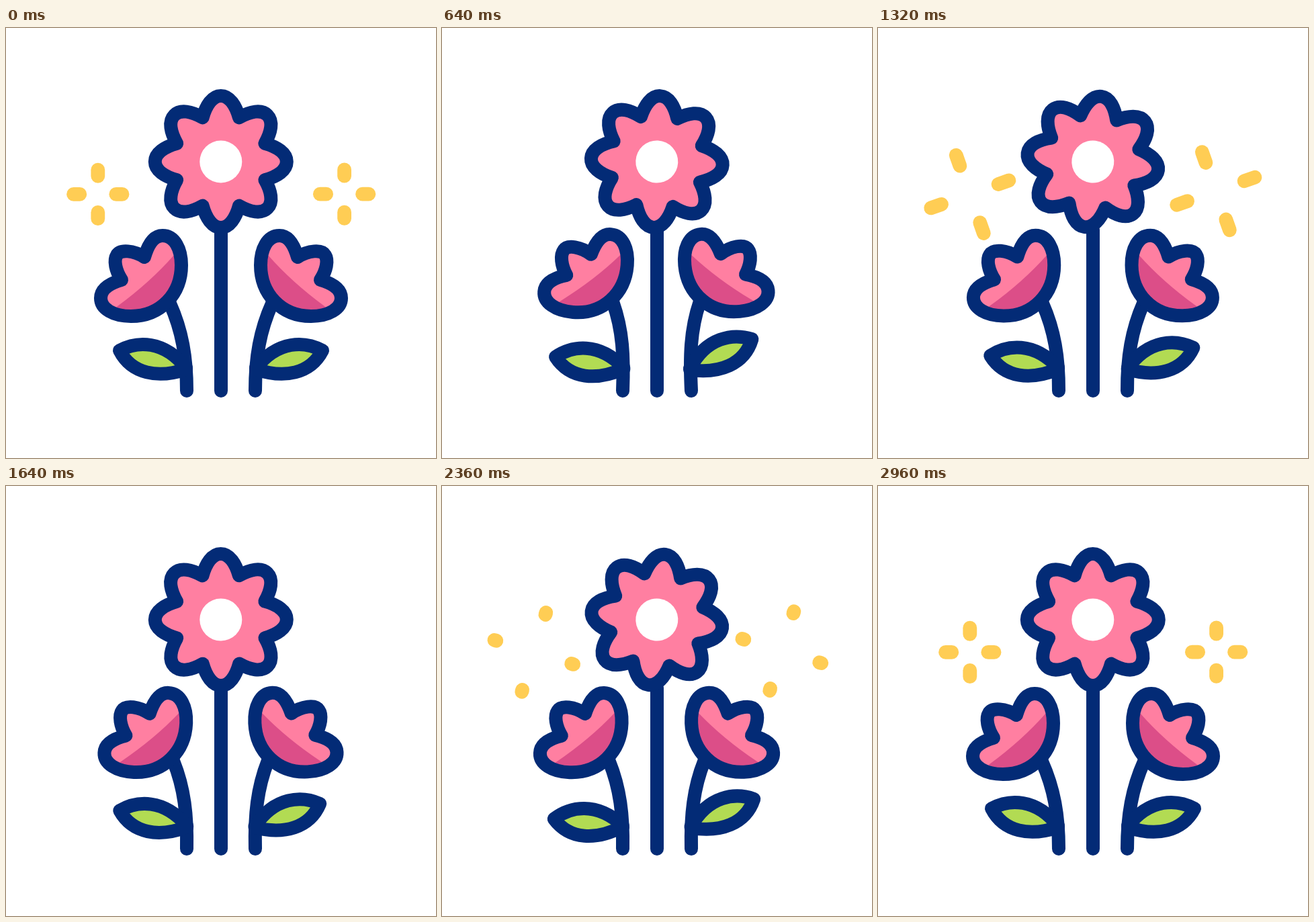
Recreate the animation shown at these times as an HTML page with a canvas. Size 640x640 px, loop 3000 ms.

```html
<!DOCTYPE html>
<html lang="en">
<head>
<meta charset="utf-8">
<title>Swaying flowers</title>
<style>
  html, body { margin: 0; width: 100%; height: 100%; overflow: hidden; background: #fff; }
  canvas { display: block; width: 100vmin; height: 100vmin; }
</style>
</head>
<body>
<canvas id="stage" width="640" height="640"></canvas>
<script>
const ctx = document.getElementById('stage').getContext('2d');
const NAVY = '#032b76', PINK = '#ff7fa1', ROSE = '#dc4e88', GREEN = '#b2db53', GOLD = '#ffcd54';
const LOOP = 3000, STEP = 40, SPAN = LOOP - STEP;
const RAD = Math.PI / 180;

const TULIP = new Path2D(`M141 402 C141 388 155 380 172 375 C163 361 160 346 165 338
  C170 329 190 331 206 341 C211 324 219 309 233 309 C251 309 261 329 261 353
  C261 395 231 429 186 429 C160 429 141 418 141 402Z`);
const SHADE = new Path2D('M152 424 L166 414 Q215 378 250 338 L262 322 L290 440 L150 450Z');
const LEAF = new Path2D('M169 480 C195 466 235 464 268 506 L268 508 C226 522 187 515 169 480Z');
const BLOOM = makeBloom(8, 71, 98);

const ramp = (t, a, b) => Math.min(1, Math.max(0, (t - a) / (b - a)));
const smooth = u => u * u * (3 - 2 * u);

// rises from 0 at a to 1 at peak, back to 0 at b
const swell = (t, a, peak, b) => smooth(ramp(t, a, peak)) * (1 - smooth(ramp(t, peak, b)));

const sway = t => swell(t, 0, 820, 1420) + swell(t, 1400, 1930, 2680);
const leftLeaf = t => -11 * swell(t, 240, 1000, 1580) - 10.6 * swell(t, 1420, 2200, SPAN);
const rightLeaf = t => 9.5 * swell(t, 240, 1000, 1460) + 8.5 * swell(t, 1440, 2130, 2850);
const bloomTurn = t => 7.4 * (swell(t, 0, 400, 820) + swell(t, 860, 1340, 1640)
  - 0.95 * swell(t, 1620, 1880, 2120) + swell(t, 2120, 2370, SPAN));

function rotate(x, y, deg) {
  const c = Math.cos(deg * RAD), s = Math.sin(deg * RAD);
  return [x * c - y * s, x * s + y * c];
}

function makeBloom(count, inner, outer) {
  const path = new Path2D();
  const [x, y] = rotate(0, -inner, 180 / count);
  const half = [[x, y], [x - 5, y - 18], [13, -outer]];
  const petal = [...half.map(([px, py]) => [-px, py]), [0, -outer], ...half.reverse()];
  for (let i = 0; i < count; i++) {
    const p = petal.map(([px, py]) => rotate(px, py, i * 360 / count));
    if (!i) path.moveTo(...p[0]);
    path.bezierCurveTo(...p[1], ...p[2], ...p[3]);
    path.bezierCurveTo(...p[4], ...p[5], ...p[6]);
  }
  path.closePath();
  return path;
}

function turn(x, y, deg) {
  ctx.translate(x, y);
  ctx.rotate(deg * RAD);
  ctx.translate(-x, -y);
}

// the root stays put and upright while the tip follows the flower
function stalk(lean) {
  ctx.save();
  ctx.translate(269, 540);
  ctx.beginPath();
  ctx.moveTo(0, 0);
  ctx.bezierCurveTo(...rotate(0, -50, lean / 2), ...rotate(-7, -90, lean), ...rotate(-25, -130, lean));
  ctx.stroke();
  ctx.restore();
}

function tulip(lean, leafAngle) {
  ctx.save();
  stalk(lean);
  turn(266, 538, lean);

  ctx.save();
  turn(262, 508, leafAngle);
  ctx.fillStyle = GREEN;
  ctx.fill(LEAF);
  ctx.stroke(LEAF);
  ctx.restore();

  ctx.fillStyle = PINK;
  ctx.fill(TULIP);
  ctx.save();
  ctx.clip(TULIP);
  ctx.fillStyle = ROSE;
  ctx.fill(SHADE);
  ctx.restore();
  ctx.stroke(TULIP);
  ctx.restore();
}

function daisy(angle) {
  ctx.beginPath();
  ctx.moveTo(320, 300);
  ctx.lineTo(320, 540);
  ctx.stroke();

  ctx.save();
  ctx.translate(319.8, 199);
  ctx.rotate(angle * RAD);
  ctx.fillStyle = PINK;
  ctx.fill(BLOOM);
  ctx.stroke(BLOOM);
  ctx.fillStyle = '#fff';
  ctx.beginPath();
  ctx.arc(0, 0, 31.5, 0, 2 * Math.PI);
  ctx.fill();
  ctx.restore();
}

// each ray grows outwards from birth, then its tail catches up after a lag
function rays(t, birth, lag) {
  const age = (t - birth + SPAN) % SPAN;
  const tip = ramp(age, 0, 510), tail = ramp(age, lag, lag + 400);
  if (tip <= tail) return;
  for (let i = 0; i < 4; i++) {
    ctx.beginPath();
    ctx.moveTo(27 + 34.6 * tail, 0);
    ctx.lineTo(27 + 34.6 * tip, 0);
    ctx.stroke();
    ctx.rotate(Math.PI / 2);
  }
}

function sparkle(t, x, y, drop) {
  ctx.save();
  ctx.translate(x, y);
  ctx.rotate(t / SPAN * 2 * Math.PI);
  ctx.translate(0, drop);
  ctx.strokeStyle = GOLD;
  ctx.lineWidth = 20.8;
  rays(t, SPAN - 136, 356);
  rays(t, 720, 394);
  rays(t, 1700, 296);
  ctx.restore();
}

function draw(t) {
  ctx.fillStyle = '#fff';
  ctx.fillRect(0, 0, 640, 640);
  ctx.lineCap = ctx.lineJoin = 'round';
  ctx.lineWidth = 20;
  ctx.strokeStyle = NAVY;

  sparkle(t, 136.8, 247.4, 0);
  sparkle(t, 503.6, 244.9, 2.3);

  const lean = 5.2 * sway(t);
  tulip(lean, leftLeaf(t) - lean);
  ctx.save();
  ctx.translate(640, 0);
  ctx.scale(-1, 1);
  tulip(1.2 * lean, rightLeaf(t));
  ctx.restore();
  daisy(bloomTurn(t));
}

const start = performance.now();
function tick(now) {
  const t = Math.max(0, now - start) % LOOP;
  draw(Math.floor(t / STEP) * STEP);
  requestAnimationFrame(tick);
}
draw(0);
requestAnimationFrame(tick);
</script>
</body>
</html>
```
